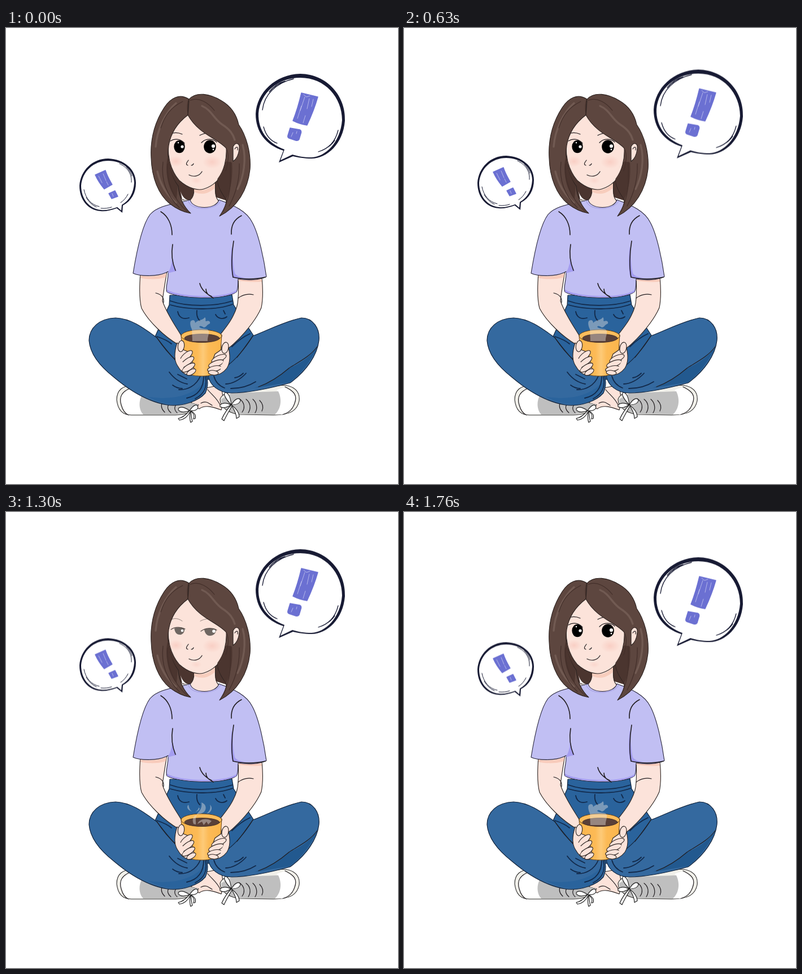
Animation, 694 px wide and 807 px high, one loop 1.79 s. Source, as an HTML page:

```html
<!DOCTYPE html>
<html lang="en">
<head>
<meta charset="utf-8">
<title>Coffee break</title>
<style>
html, body { margin: 0; width: 100%; height: 100%; overflow: hidden; background: #fff; }
svg { display: block; width: 100vw; height: 100vh; }
path, ellipse { stroke-linecap: round; stroke-linejoin: round; }
.ink { fill: none; stroke: #211d20; stroke-width: 1.2; }
.ink.bold { stroke-width: 1.6; }
.ink.soft { stroke: #a19be0; stroke-width: 1; }
.ink.lid { stroke: #554b48; }
.skin { fill: #fce3da; stroke: #2b2422; stroke-width: 1.1; }
.hair { fill: #5d463f; stroke: #2a201e; stroke-width: 1.1; }
.under { fill: #4b352f; }
.shine { fill: none; stroke: #715a52; stroke-width: 3.4; }
.strand { fill: none; stroke: #432f2a; stroke-width: 1.2; }
.denim { fill: #34699f; stroke: #12233b; stroke-width: 1.2; }
.hips { fill: #2a639c; }
.shade { fill: #22598f; }
.fold { fill: none; stroke: #12294a; stroke-width: 1.8; }
.shoe { fill: #f1f0ea; stroke: #2b2a2a; stroke-width: 1.1; }
.toe { fill: #fff; }
.cloth { fill: #bfbfbf; }
.lace { fill: #fff; stroke: #222; stroke-width: 1.2; }
.violet { fill: #a49df0; }
.navy { fill: #171a33; }
.thin { fill: none; stroke: #171a33; stroke-width: 1.3; }
.small .thin { stroke-width: 1; }
.mark { fill: #6b70d2; stroke: #6b70d2; stroke-width: 1.4; }
.scratch { fill: none; stroke: #d4d6f5; stroke-width: .7; }
.steam { fill: #e8e4e2; fill-opacity: .43; }

.big { animation: big 1790ms linear infinite; }
.small { animation: small 1790ms linear infinite; }
.open { animation: open 1790ms linear infinite; }
.half { opacity: 0; animation: half 1790ms linear infinite; }
.steam { animation: 596.667ms step-end infinite; }
.tall { animation-name: tall; }
.curl { animation-name: curl; }
.wisp { animation-name: wisp; }

@keyframes big {
  0%, 100% { transform: translateY(0); }
  6% { transform: translateY(3.2px); }
  10.6% { transform: translateY(5.2px); }
  13.4% { transform: translateY(5px); }
  17% { transform: translateY(3.7px); }
  35.2% { transform: translateY(-7.4px); }
  50.3% { transform: translateY(-14.2px); }
  57% { transform: translateY(-18px); }
  61.5% { transform: translateY(-19px); }
  66% { transform: translateY(-18.2px); }
  72.6% { transform: translateY(-15.2px); }
  83.8% { transform: translateY(-8.2px); }
}
@keyframes small {
  0%, 100% { transform: translateY(0); }
  7% { transform: translateY(1.2px); }
  13.4% { transform: translateY(1.2px); }
  35.2% { transform: translateY(-5px); }
  50.3% { transform: translateY(-8px); }
  59% { transform: translateY(-9px); }
  66% { transform: translateY(-8.5px); }
  72.6% { transform: translateY(-7.6px); }
  83.8% { transform: translateY(-4px); }
  98.3% { transform: translateY(-.6px); }
}
@keyframes open { 0%, 71%, 78.5%, 100% { opacity: 1; } 72.4%, 77% { opacity: 0; } }
@keyframes half { 0%, 71%, 78.5%, 100% { opacity: 0; } 72.4%, 77% { opacity: 1; } }
@keyframes tall { 0% { opacity: 1; } 12% { opacity: 0; } 74% { opacity: 1; } }
@keyframes wisp { 0% { opacity: 0; } 12% { opacity: 1; } 32% { opacity: 0; } }
@keyframes curl { 0% { opacity: 0; } 32% { opacity: 1; } 74% { opacity: 0; } }
</style>
</head>
<body>
<svg viewBox="0 0 694 807" preserveAspectRatio="none">
<defs>
  <radialGradient id="blush"><stop offset="0" stop-color="#f8c6bb" stop-opacity=".7"/><stop offset="1" stop-color="#f8c6bb" stop-opacity="0"/></radialGradient>
  <linearGradient id="glaze"><stop offset="0" stop-color="#fbb54c"/><stop offset=".4" stop-color="#fcba56"/><stop offset=".54" stop-color="#fdca78"/><stop offset=".68" stop-color="#fcba56"/><stop offset="1" stop-color="#fbb54c"/></linearGradient>
</defs>

<!-- shoes and ankles -->
<path class="skin" d="M338 640L380 632C384 648 386 660 381 676C368 671 353 666 342 674L326 668Z"/>
<path class="ink" d="M357 640C365 650 374 655 380 669M345 664C354 659 359 664 365 668"/>
<path class="shoe" d="M230 633C205 631 196 642 196 658C198 677 207 685 222 685L300 685C317 684 331 680 341 667L285 652Z"/>
<path class="toe" d="M224 637C204 643 200 654 204 667C207 678 212 683 217 684L300 684L290 655Z"/>
<path class="ink" d="M222 637C204 643 200 654 204 667C207 678 212 683 217 685"/>
<path class="cloth" d="M240 651C234 663 236 677 243 684L300 684C318 682 332 676 340 666L285 655Z"/>
<path class="ink" d="M278 661C273 668 275 674 281 680M289 665C284 671 287 677 292 681M301 667C297 672 299 678 303 681"/>
<path class="shoe" d="M490 632C511 633 521 644 519 660C515 679 500 685 474 685L412 684C395 681 379 672 379 657C382 646 398 644 408 643Z"/>
<path class="toe" d="M492 636C511 643 516 651 511 664C507 676 500 681 490 684L474 684L480 640Z"/>
<path class="ink" d="M494 635C511 643 516 651 511 664C507 676 500 681 490 684"/>
<path class="cloth" d="M400 646L482 643C489 657 487 674 476 684L412 683C396 680 381 672 381 657Z"/>
<path class="ink" d="M413 656C422 662 424 672 418 680M425 657C433 663 434 673 429 681M437 657C444 663 446 674 441 681M449 659C455 665 456 672 453 678"/>
<path class="lace" d="M325 677C310 667 302 672 306 677C311 681 318 680 325 677C332 667 338 664 340 671C339 677 333 678 325 677C319 684 313 690 305 691L307 694C316 693 322 687 326 679C325 688 325 693 327 698L330 696C328 690 328 684 327 678C333 682 334 686 332 692L335 691C337 684 333 680 325 677Z"/>
<path class="lace" d="M399 667C389 657 383 646 389 645C396 647 398 658 399 667C405 656 413 653 415 659C414 665 406 667 399 667C390 676 386 683 382 692L386 695C390 686 395 678 400 669C405 677 408 684 408 691L413 688C413 681 407 673 399 667ZM398 667C388 661 377 665 379 670C384 674 393 671 398 667Z"/>

<!-- jeans -->
<path class="denim hips" d="M290 473L289 490L264 546L312 622L392 622L438 544L403 490L400 472Z"/>
<path class="denim" d="M267 548C245 532 222 514 194 513C165 514 147 531 147 553C149 579 168 600 191 618C217 640 249 661 285 667C312 671 341 660 353 646C358 634 358 622 354 612L312 600C295 585 281 566 267 548Z"/>
<path class="hips" d="M250 652C290 659 326 653 350 628L354 628C354 645 344 656 320 664C296 670 270 663 250 652Z"/>
<path class="denim" d="M437 545C463 535 494 519 523 513C544 513 556 532 554 553C551 579 532 607 503 628C470 637 430 646 398 646C376 645 361 632 358 616L389 600C409 585 426 563 437 545Z"/>
<path class="shade" d="M552 564C537 594 519 616 502 627L440 637C470 627 486 615 501 602C524 593 542 578 552 564Z"/>
<path class="ink" d="M551 564C538 582 516 592 501 602C486 615 469 627 447 635M437 545C430 555 421 568 409 583M267 548C277 563 288 577 301 588"/>
<path class="fold" d="M291 483C321 494 371 493 401 483M291 490C325 500 375 499 401 489M304 502C306 513 314 516 324 513M338 500C337 508 339 514 343 518M371 507C375 515 385 516 391 511M385 500L388 506M267 546C276 549 286 553 293 559M432 541C421 546 409 555 400 564"/>
<path class="fold" d="M289 609C298 621 309 628 321 630M304 613L320 621M306 640C321 641 337 633 344 616M320 655C342 650 350 636 350 616M335 656C351 648 357 634 353 617M295 632Q303 638 312 638M368 616C371 627 379 634 387 637M389 630C400 630 414 623 425 611M398 638C417 638 431 633 442 626M405 619Q413 618 420 611"/>

<!-- arms -->
<path class="skin" d="M238 434C236 459 236 482 240 496C252 519 280 546 306 561L313 549C302 530 285 507 277 483C279 465 282 449 285 430Z"/>
<path class="skin" d="M411 440C412 463 412 480 409 492C403 514 389 530 379 543L382 575C407 560 441 521 452 495C455 480 455 461 453 442Z"/>
<path fill="#f8cbbb" d="M238 438C253 442 271 439 284 434L283 441C268 446 249 445 238 442ZM411 444L453 445V449C437 450 422 449 411 447Z"/>
<path class="ink" d="M265 469C274 471 280 476 279 486M411 478C419 472 429 470 438 472"/>

<!-- hair behind, neck -->
<path class="under" d="M285 200H403V290L389 305L370 299L334 305H313L286 275Z"/>
<path class="skin" d="M333 275C334 292 332 301 323 307C328 324 371 325 378 307C369 301 370 287 371 266Z"/>
<path d="M333 280C347 292 360 286 370 273L370 283C358 294 345 296 333 290Z" fill="#f7cdbd"/>

<!-- shirt -->
<path fill="#c1bff3" stroke="#29263b" stroke-width="1.1" d="M326 304C306 311 272 311 255 330C240 350 231 397 225 434C238 440 267 440 283 433L287 431C288 447 281 459 285 467C304 479 387 483 408 467C412 460 410 452 411 444C428 447 450 446 461 440C457 411 448 366 436 344C426 324 404 314 377 304C372 322 330 322 326 304Z"/>
<path class="violet" d="M294 402C296 415 297 423 302 430L286 434C292 426 294 415 294 402ZM400 386C396 410 398 430 401 442L425 443C415 441 408 439 405 434C402 421 402 405 400 386ZM285 463C304 476 390 480 409 463L408 467C388 481 307 478 285 467Z"/>
<path class="ink bold" d="M274 325C287 333 294 348 294 366M295 383C292 401 295 417 300 429M417 332C405 338 398 348 399 365M403 377C399 400 399 425 402 441C418 445 442 445 459 441M343 452C346 464 355 470 367 478M354 462C354 469 358 473 364 475"/>
<path class="ink soft" d="M323 306C325 324 373 324 380 306"/>

<!-- face -->
<path class="skin" d="M322 153C300 164 288 188 287 210C287 234 293 254 307 270C323 284 339 288 350 285C367 280 381 266 388 248L397 215L385 180Z"/>
<ellipse cx="301" cy="236" rx="13" ry="10" fill="url(#blush)"/>
<ellipse cx="365" cy="237" rx="17" ry="12" fill="url(#blush)"/>
<ellipse cx="337" cy="270" rx="10" ry="6" fill="url(#blush)" opacity=".6"/>
<path class="ink" d="M323 234C319 239 318 242 322 243M328 243Q331 243 332 240M324 260C332 264 342 263 347 254"/>
<g class="open">
  <path class="ink" d="M290 188C298 184 305 185 312 188M343 190C352 185 363 185 373 188"/>
  <ellipse cx="307" cy="210" rx="9.7" ry="11.3"/>
  <ellipse cx="361" cy="210" rx="10.8" ry="11.8"/>
  <path class="ink" d="M291 200C299 195 309 196 316 204M346 203C353 195 366 195 373 202"/>
  <g fill="#fff"><circle cx="312" cy="210" r="2.6"/><circle cx="305" cy="203" r="1.2"/><circle cx="367" cy="209" r="3.1"/><circle cx="367" cy="215" r="1.4"/></g>
</g>
<g class="half">
  <g fill="none" stroke="#8f807b"><path d="M291 191C298 187 305 188 312 193M344 193C353 188 363 188 370 192"/></g>
  <g fill="#6f6762"><path d="M298 206C303 204 310 204 316 206C317 213 312 218 307 217C302 217 299 213 298 206Z"/><path d="M351 208C356 205 366 205 372 208C372 215 367 219 361 219C355 219 352 214 351 208Z"/></g>
  <path class="ink lid" d="M292 208C299 203 309 203 317 207M345 211C353 205 365 204 373 209"/>
  <g fill="#fff"><circle cx="312" cy="210" r="2.3"/><circle cx="368" cy="211" r="2.8"/></g>
</g>

<!-- hair in front -->
<path d="M309 289C312 299 317 303 324 306L312 303Z" fill="#fff"/>
<path class="hair" d="M324 126C307 115 291 124 280 141C265 164 255 194 257 230C258 265 270 295 290 311C302 320 314 326 327 328C315 317 306 299 305 280C291 261 284 237 288 208C292 184 306 166 322 154Z"/>
<path class="hair" d="M324 126C337 112 361 116 382 129C399 139 408 153 412 171C426 191 434 222 432 250C428 286 410 317 378 333C386 321 392 309 389 302C378 287 374 276 375 267C386 253 391 232 390 213C374 195 341 188 322 154Z"/>
<path class="under" d="M287 226C280 250 286 285 302 303L304 280C294 264 288 245 287 226ZM389 236C386 253 376 263 375 268C374 278 382 292 390 303C398 288 402 262 400 238Z"/>
<path class="skin" d="M402 210C407 201 414 204 413 213C412 224 408 232 402 236Z"/>
<path class="ink" d="M405 214C408 209 411 210 410 216"/>
<path class="shine" d="M301 133C282 149 267 181 265 210M347 138C364 145 367 160 383 171C397 180 402 188 405 198M419 207C426 232 421 263 410 285M268 254C274 279 286 297 301 309"/>
<path class="strand" d="M323 127C320 136 321 145 322 153M326 128C342 122 358 132 369 146M286 240C284 269 294 301 321 325M278 237C274 270 285 297 307 318M397 237C397 264 401 290 384 325M413 240C414 268 408 291 395 315M390 213C396 225 393 240 389 253M313 130C292 140 281 155 274 177"/>

<!-- mug -->
<path d="M310 543L313 602C318 614 333 616 347 616C361 616 374 613 378 602L382 543Z" fill="url(#glaze)" stroke="#6d4a1d"/>
<ellipse cx="346" cy="545" rx="36" ry="11" fill="#fbbd5c" stroke="#5a3d1b"/>
<ellipse cx="347" cy="549" rx="31" ry="7.5" fill="#5a4038" stroke="#3d2a22" stroke-width=".8"/>
<path class="steam tall" d="M330 554L329 533C326 527 325 520 328 518C333 515 335 519 335 522C340 516 348 518 352 512C355 515 352 518 354 519C359 517 362 519 361 523C355 525 355 530 350 530C347 528 344 526 342 529C347 534 357 530 359 536C360 543 356 548 357 554Z"/>
<g class="steam curl">
  <path d="M324 516C328 512 331 516 328 521C324 523 322 520 324 516ZM345 515C353 510 363 516 364 523C361 530 353 530 348 533C357 535 363 541 363 548L359 554L355 545L352 552L348 544L345 552L341 545L338 553L332 550C327 541 331 534 338 531C347 528 351 523 345 515Z"/>
</g>
<g class="steam wisp">
  <path d="M323 518C324 523 325 527 329 530C321 527 319 522 323 518ZM346 514C352 516 356 522 352 529C348 534 342 534 337 536C341 530 348 526 346 514ZM361 518C367 523 364 532 355 534C361 529 363 524 361 518ZM341 523C345 525 341 529 335 531C339 528 341 526 341 523Z"/>
  <path d="M332 552C328 542 334 536 338 537C334 543 337 549 336 553ZM339 552C342 543 356 541 364 547L358 553L355 548L350 554L347 548Z"/>
</g>

<!-- hands -->
<path class="skin" d="M303 557C298 573 297 588 304 598C310 609 319 615 328 615L333 604L326 574L315 570Z"/>
<path class="skin" d="M393 562C397 577 398 591 391 602C384 611 375 615 365 614L360 604L370 577L380 570Z"/>
<g class="skin">
  <ellipse cx="310" cy="563" rx="5.6" ry="10" transform="rotate(8 310 563)"/>
  <ellipse cx="319" cy="581" rx="14" ry="5.6" transform="rotate(-42 319 581)"/>
  <ellipse cx="321" cy="591" rx="14" ry="5.3" transform="rotate(-37 321 591)"/>
  <ellipse cx="323" cy="601" rx="13" ry="5" transform="rotate(-32 323 601)"/>
  <ellipse cx="328" cy="609" rx="9" ry="4.3" transform="rotate(-30 328 609)"/>
  <ellipse cx="388" cy="566" rx="5.8" ry="10" transform="rotate(12 388 566)"/>
  <ellipse cx="377" cy="585" rx="14" ry="5.4" transform="rotate(-24 377 585)"/>
  <ellipse cx="372" cy="594" rx="14" ry="5.2" transform="rotate(-20 372 594)"/>
  <ellipse cx="369" cy="603" rx="12.5" ry="4.9" transform="rotate(-12 369 603)"/>
  <ellipse cx="367" cy="610" rx="9" ry="4.1" transform="rotate(6 367 610)"/>
</g>
<path fill="#fce3da" d="M300 578C299 590 304 600 312 605L316 597L310 586ZM394 577C396 590 390 600 382 607L379 602L386 588Z"/>

<!-- speech bubbles -->
<g class="big">
  <path class="navy" d="M491 217C460 207 442 184 442 152C444 114 477 82 521 81C569 82 602 121 600 164C597 205 568 231 541 231C528 231 517 229 508 227L483 238Z"/>
  <path fill="#fff" d="M493 215C463 204 446 181 447 151C450 115 481 88 521 88C565 88 595 123 595 163C592 203 565 228 541 229C528 229 517 227 507 224L486 234Z"/>
  <path class="thin" d="M454 145C457 118 478 97 509 90M466 113Q478 98 494 94M456 175C460 190 469 200 480 204M588 181C583 202 570 214 553 219M582 199Q575 209 566 213"/>
  <path class="mark" d="M523 115L552 122C547 140 540 157 533 172Q520 170 508 164C514 149 519 132 523 115ZM503 177L520 180Q524 182 522 187L519 197Q517 200 513 199L501 195Q498 194 499 190Z"/>
  <path class="scratch" d="M529 122L521 146M537 125L533 143M544 126L541 139M523 138L516 160M530 155L526 168M508 185L505 192M515 183L514 187M527 118L532 122L538 120"/>
</g>
<g class="small">
  <path class="navy" d="M207 314L206 327L196 319C185 323 176 325 167 324C144 322 130 303 130 279C132 252 153 231 181 231C209 232 230 250 230 274C230 292 222 306 207 314Z"/>
  <path fill="#fff" d="M205 313L204 323L197 317C186 321 177 323 168 322C147 320 133 302 133 279C135 254 155 235 181 235C207 235 227 252 227 274C226 291 219 305 205 313Z"/>
  <path class="thin" d="M138 286C141 302 151 313 165 316M142 300Q149 312 160 317M201 240C216 247 223 259 222 273M213 246Q221 254 223 262M216 294Q211 304 203 309M168 319Q179 320 187 317"/>
  <path class="mark" d="M158 260L176 252C179 262 184 270 188 277L174 285C168 278 162 269 158 260ZM182 293L193 288L198 298L187 302Z"/>
  <path class="scratch" d="M164 262L170 274M172 258L177 270M178 272L181 278M188 293L190 298"/>
</g>
</svg>
</body>
</html>
```
